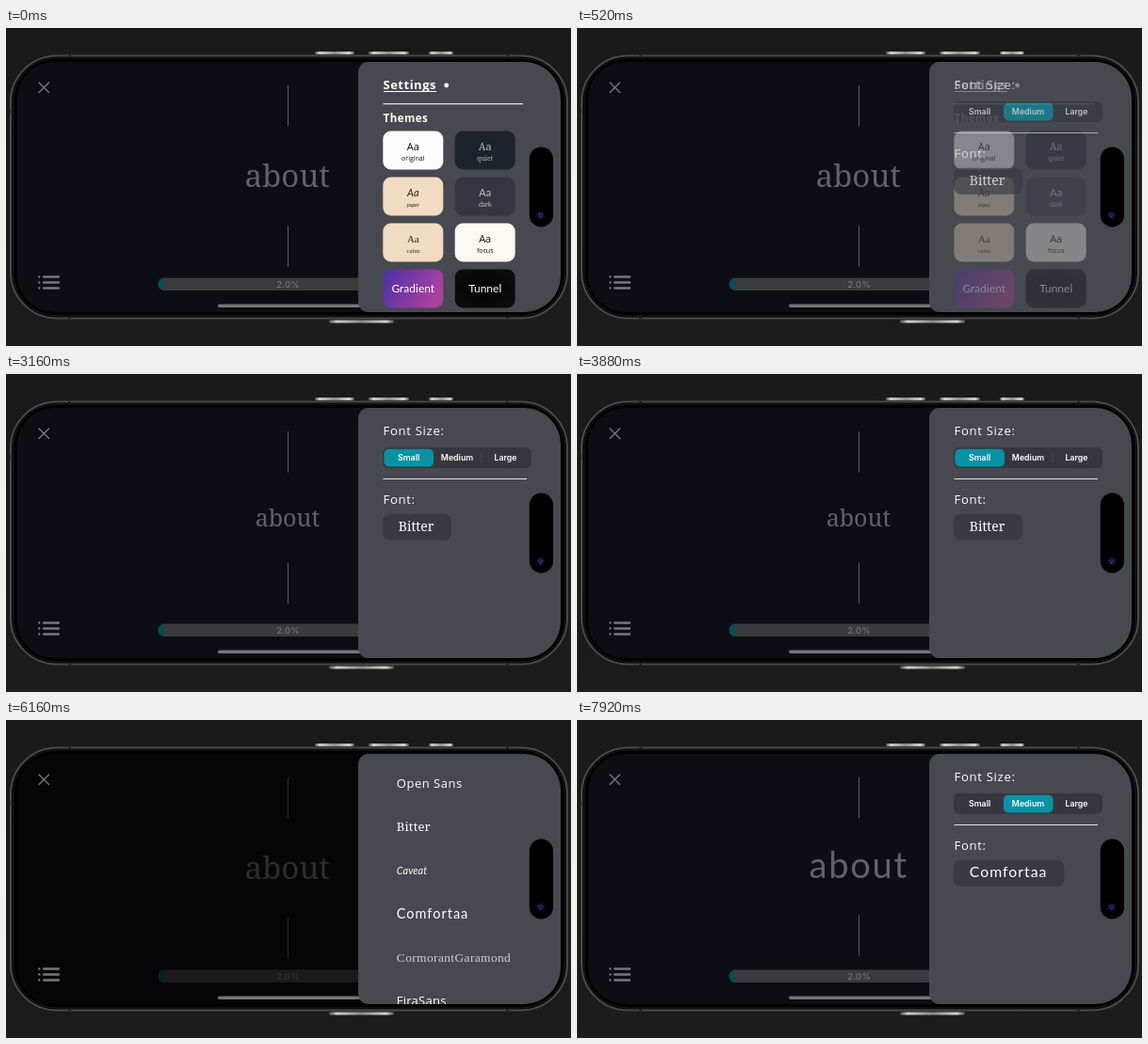
Animation of 600x338 px, one loop 8000 ms. Source, as an HTML page:

```html
<!DOCTYPE html>
<html lang="en">
<head>
<meta charset="utf-8">
<title>Reader settings</title>
<style>
  html, body { margin: 0; width: 100%; height: 100%; overflow: hidden; background: #1b1b1b; }
  svg { display: block; width: 600px; height: 338px; }
  .sans { font-family: "Open Sans", "Noto Sans", sans-serif; }
  .serif { font-family: "Noto Serif", serif; }
  .round { font-family: Lato, sans-serif; }
  .hand { font-family: Lato, sans-serif; font-style: italic; }
  .thin { font-family: "Liberation Serif", serif; }
  .ui { font-family: Inter, Roboto, sans-serif; }
  .bold { font-weight: 700; }
  .mid { text-anchor: middle; }
</style>
</head>
<body>
<svg viewBox="0 0 600 338">
  <defs>
    <clipPath id="screenClip"><rect x="12" y="36" width="577" height="266" rx="39"/></clipPath>
    <linearGradient id="page" x2="0" y2="1">
      <stop stop-color="#1a1a1a"/><stop offset="1" stop-color="#1c1c1c"/>
    </linearGradient>
    <linearGradient id="metal">
      <stop stop-color="#4a4a48"/><stop offset=".12" stop-color="#cfcfcd"/>
      <stop offset=".5" stop-color="#8b8b89"/><stop offset=".88" stop-color="#d2d2d0"/>
      <stop offset="1" stop-color="#4a4a48"/>
    </linearGradient>
    <linearGradient id="violet" y2=".35">
      <stop stop-color="#4a2fa6"/><stop offset="1" stop-color="#a9419f"/>
    </linearGradient>
    <radialGradient id="tunnel">
      <stop stop-color="#000"/><stop offset="1" stop-color="#0b0b0c"/>
    </radialGradient>
  </defs>

  <rect width="600" height="338" fill="url(#page)"/>
  <g id="buttons" fill="url(#metal)"></g>
  <rect x="5" y="29.5" width="591" height="279" rx="49" fill="#050505" stroke="#4b4b49" stroke-width="2"/>
  <rect x="7.5" y="32" width="586" height="274" rx="46" fill="#000" stroke="#1d1d1d"/>
  <path d="M3.8 86v5M66 29.5h3M66 308.500h3M531 29.500h3M531 308.500h3" stroke="#222" stroke-width="2"/>

  <g clip-path="url(#screenClip)">
    <rect x="12" y="36" width="577" height="266" fill="#0d0e13"/>
    <g id="reader">
      <path id="guides" stroke="#5c5d60" fill="none"/>
      <text id="word" fill="#626366"></text>
      <rect x="162" y="265.500" width="275" height="13.500" rx="6.700" fill="#3b3b3d"/>
      <path d="M168 265.500v13.500a6.500 6.750 0 0 1 0-13.500" fill="#0b4d54"/>
      <text class="ui mid" x="299.500" y="275.900" font-size="9.600" letter-spacing=".2" fill="#7e7e81">2.0%</text>
    </g>
    <rect id="dim" x="12" y="36" width="577" height="266" fill="#000"/>
    <g stroke="#77787b" stroke-linecap="round" fill="none">
      <path d="M35 58l10.500 10.500M45.500 58l-10.500 10.500" stroke-width="1.400"/>
      <path d="M40 264.500h16M40 270.500h16M40 276.500h16M35.200 264.500h.1M35.200 270.500h.1M35.200 276.500h.1" stroke-width="2.300"/>
    </g>
    <rect x="225" y="293.500" width="160" height="3.600" rx="1.800" fill="#747578"/>

    <rect x="374" y="36" width="260" height="266" rx="11" fill="#464950"/>
    <g id="themes">
      <text class="sans bold" x="400.500" y="65" font-size="13" letter-spacing=".5" fill="#fff">Settings</text>
      <path d="M401 67.500h56" stroke="#fff"/>
      <circle cx="467.700" cy="61" r="2.400" fill="#fff"/>
      <path d="M400.500 80.700H549" stroke="#e4e4e6" stroke-width="1.200"/>
      <text class="sans bold" x="400.500" y="100.300" font-size="11.500" letter-spacing=".5" fill="#fff">Themes</text>
      <g id="tiles"></g>
    </g>
    <g id="fontPage">
      <text class="sans" x="400.500" y="65" font-size="13.200" letter-spacing=".65" fill="#fff">Font Size:</text>
      <rect x="400" y="78" width="158" height="22" rx="6" fill="#37363f"/>
      <path id="sepLeft" d="M453.500 84v10" stroke="#4d4c55"/>
      <path id="sepRight" d="M505 84v10" stroke="#4d4c55"/>
      <rect id="pill" y="79.800" width="52.500" height="18.600" rx="5" fill="#0693a5"/>
      <g class="ui mid" font-size="8.800" font-weight="600" fill="#fff">
        <text x="427.600" y="92.200">Small</text>
        <text x="479" y="92.200">Medium</text>
        <text x="530.500" y="92.200">Large</text>
      </g>
      <path d="M400.500 111.500H553" stroke="#e4e4e6" stroke-width="1.200"/>
      <text class="sans" x="400.500" y="137.500" font-size="13.200" letter-spacing=".65" fill="#fff">Font:</text>
      <rect id="choice" x="400" y="148.700" height="28" rx="7.500" fill="#3a3942"/>
      <text id="choiceName" x="416.800" fill="#fff"></text>
    </g>
    <g id="list"></g>

    <rect x="555.800" y="126.500" width="25.200" height="85" rx="12.600" fill="#000"/>
    <circle cx="567.700" cy="199" r="4.800" fill="#0c0b20"/>
    <circle cx="567.700" cy="199" r="2.900" fill="#1b1848"/>
    <path d="M566 198h.1M569.300 198h.1M567.700 200.700h.1" stroke="#4a47a0" stroke-width="1.200" stroke-linecap="round"/>
  </g>
</svg>
<script>
const $ = id => document.getElementById(id);
const LOOP = 8000;

// Side buttons: x, y, width
$('buttons').innerHTML = [[328, 25, 42], [385, 25, 43], [449, 25, 26], [343, 310.5, 69]]
  .map(([x, y, w]) => `<rect x="${x}" y="${y}" width="${w}" height="3" rx="1"/>`).join('');

// Theme tiles: label, font class, fill, text colour
$('tiles').innerHTML = [
  ['original', 'sans', '#fdfdfd', '#111'],
  ['quiet', 'serif', '#1e222b', '#b9bac0'],
  ['paper', 'hand', '#f1dcc1', '#2b241c'],
  ['dark', 'round', '#37353f', '#c2c1c8'],
  ['calm', 'thin', '#f1dcc1', '#2b241c'],
  ['focus', 'sans', '#fff9f1', '#111'],
  ['Gradient', 'round', 'url(#violet)', '#fff'],
  ['Tunnel', 'round', 'url(#tunnel)', '#fff'],
].map(([name, font, fill, ink], i) => {
  const x = i % 2 ? 476.700 : 400.300;
  const y = 109.500 + (i >> 1) * 49;
  const cx = x + 32;
  const label = (text, dy, size) =>
    `<text class="${font} mid" x="${cx}" y="${y + dy}" font-size="${size}" fill="${ink}">${text}</text>`;
  const big = i > 5;
  return `<rect x="${x}" y="${y}" width="64" height="41" rx="8.500" fill="${fill}"/>` +
    (big ? label(name, 24.5, 12) : label('Aa', 20.3, 11) + label(name, 31, font === 'hand' ? 5.5 : 7));
}).join('');

// Font list: name, font class, size, letter spacing
$('list').innerHTML = [
  ['Open Sans', 'sans', 13, .5],
  ['Bitter', 'serif', 13, .2],
  ['Caveat', 'hand', 10.8, .1],
  ['Comfortaa', 'round', 14.5, 1],
  ['CormorantGaramond', 'thin', 13.5, .35],
  ['FiraSans', 'sans', 13, .25],
].map(([name, font, size, gap], i) =>
  `<text class="${font}" x="414.800" y="${72 + i * 46.2}" font-size="${size}" letter-spacing="${gap}" fill="${font === 'thin' ? '#cfd0d3' : '#fff'}">${name}</text>`
).join('');

const ramp = (t, from, to) => Math.min(1, Math.max(0, (t - from) / (to - from)));
const ease = p => 1 - (1 - p) ** 3;

function set(el, attrs) {
  for (const key in attrs) el.setAttribute(key, attrs[key]);
}

// Reader word: font class, size, spacing, left edge, baseline, top of lower guide
const looks = {
  medium: ['serif', 33, 0, 253.5, 168.5, 210],
  small: ['serif', 25, 0, 264.7, 161.5, 200.5],
  round: ['round', 38, 1.8, 246.5, 167.5, 207],
};

function draw(t) {
  const opened = ramp(t, 300, 640);
  const listed = ramp(t, 5120, 5440) - ramp(t, 7200, 7500);
  const toSmall = ease(ramp(t, 2440, 2800)) - ease(ramp(t, 4160, 4520));
  const picked = t >= 7200;

  $('themes').setAttribute('opacity', 1 - opened);
  $('fontPage').setAttribute('opacity', opened * (1 - listed));
  $('list').setAttribute('opacity', listed);
  $('dim').setAttribute('opacity', listed * .54);

  $('pill').setAttribute('x', 453 - 51.5 * toSmall);
  $('sepLeft').setAttribute('opacity', 0);
  $('sepRight').setAttribute('opacity', toSmall);

  const look = picked ? 'round' : t >= 2480 && t < 4200 ? 'small' : 'medium';
  const [font, size, gap, x, y, guide] = looks[look];
  const word = $('word');
  word.textContent = 'about';
  set(word, { class: font, 'font-size': size, 'letter-spacing': gap, x, y });
  $('guides').setAttribute('d', `M299.500 61v43.500M299.500 ${guide}v43.500`);

  const name = $('choiceName');
  name.textContent = picked ? 'Comfortaa' : 'Bitter';
  set(name, picked
    ? { class: 'round', 'font-size': 15.8, 'letter-spacing': 1, y: 167.3 }
    : { class: 'serif', 'font-size': 14, 'letter-spacing': 0, y: 167.3 });
  $('choice').setAttribute('width', picked ? 117.5 : 73);
}

const start = performance.now();
function tick() {
  draw((performance.now() - start) % LOOP);
  requestAnimationFrame(tick);
}
tick();
</script>
</body>
</html>
```
